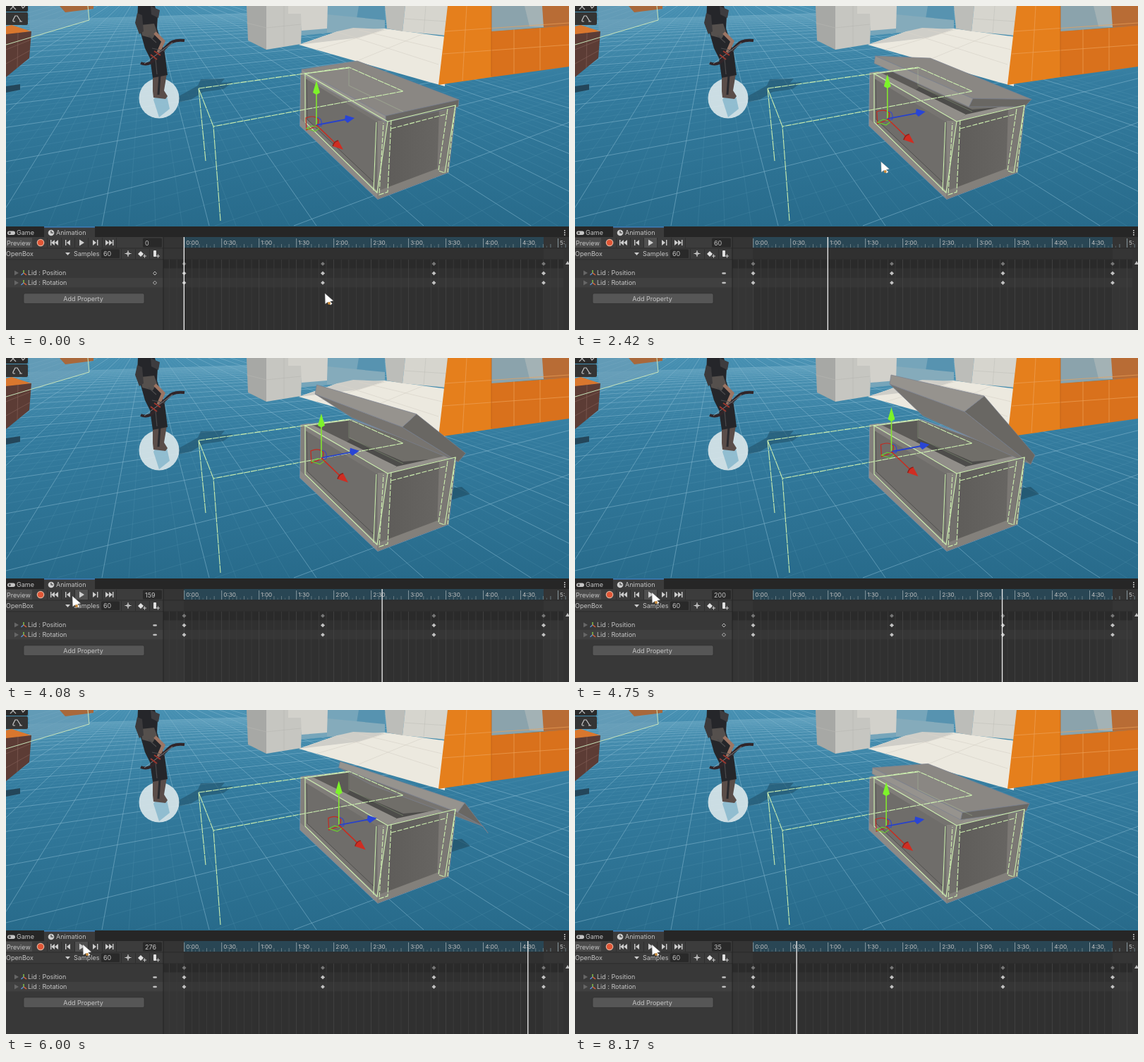
Write an HTML page that moves like this. It is 798 px wide and 460 px high and loops after 8.33 s.

```html
<!DOCTYPE html>
<html lang="en">
<head>
<meta charset="utf-8">
<title>Chest lid animation</title>
<style>
html, body { margin: 0; width: 100%; height: 100%; overflow: hidden; background: #383838; }
svg { display: block; width: 798px; height: 460px; }
text { font: 9px Inter, "Open Sans", sans-serif; fill: #c4c4c4; white-space: pre; }
.wire { fill: none; stroke: #cdf0b0; stroke-width: 1.1; }
</style>
</head>
<body>
<svg id="stage" viewBox="0 0 798 460">
<defs>
  <linearGradient id="floor" x1="0" y1="0" x2="0" y2="1">
    <stop offset="0" stop-color="#4790b2"/><stop offset=".35" stop-color="#347c9f"/><stop offset="1" stop-color="#286b8b"/>
  </linearGradient>
  <linearGradient id="front" x1="0" y1="0" x2="1" y2="1">
    <stop offset="0" stop-color="#85827e"/><stop offset="1" stop-color="#6b6966"/>
  </linearGradient>
  <linearGradient id="side" x1="0" y1="0" x2="1" y2="0">
    <stop offset="0" stop-color="#5d5b58"/><stop offset="1" stop-color="#6a6865"/>
  </linearGradient>
  <clipPath id="view"><rect width="798" height="313"/></clipPath>
</defs>
<g clip-path="url(#view)">
  <rect width="798" height="313" fill="url(#floor)"/>
  <g id="grid"></g>
  <g id="blocks"></g>
  <g id="hero"></g>
  <g id="chest"></g>
  <g id="lid"></g>
  <g id="wires"></g>
  <g id="gizmo"></g>
  <g id="tools"></g>
</g>
<g id="panel"></g>
<g id="live"></g>
<g id="tip"></g>
<g id="mouse"></g>
</svg>
<script>
const $ = id => document.getElementById(id);
const NS = 'http://www.w3.org/2000/svg';

function add(parent, tag, attrs, text) {
  const el = document.createElementNS(NS, tag);
  for (const k in attrs) el.setAttribute(k, attrs[k]);
  if (text != null) el.textContent = text;
  (typeof parent === 'string' ? $(parent) : parent).append(el);
  return el;
}
const poly = (g, points, fill, more) => add(g, 'polygon', { points, fill, ...more });
const path = (g, d, stroke, more) => add(g, 'path', { d, stroke, fill: 'none', ...more });
const rect = (g, x, y, width, height, fill, more) => add(g, 'rect', { x, y, width, height, fill, ...more });
const label = (g, x, y, s, more) => add(g, 'text', { x, y, ...more }, s);

// Floor grid: two bundles of lines that meet on the horizon
function bundle(vx, vy, from, to, step) {
  for (let i = 0, x = from; x <= to; x += step, i++) {
    const major = i % 4 === 0;
    path('grid', `M${vx} ${vy}L${x} 312`, major ? '#86b9cf' : '#6fa8c0',
      { 'stroke-width': major ? 1 : .7, opacity: major ? .55 : .24 });
  }
}
bundle(199, -36, -1080, 1500, 38);
bundle(1290, -20, -9000, 1100, 112);

// Far scenery
poly('blocks', '32,0 118,0 118,20 34,45', '#6b9fb9', { opacity: .75 });
poly('blocks', '76,0 124,0 124,4 84,9', '#a8683b');
poly('blocks', '0,29 8,27 36,36 0,41', '#d9772e');
poly('blocks', '0,40 36,36 33,74 0,101', '#5c3c35');
path('blocks', 'M0 62L35 48M0 82L34 63M17 38L16 88', '#85625a', { 'stroke-width': .6 });
path('blocks', 'M0 55L118 20L116 0', '#c7e4ba', { 'stroke-width': 1 });
poly('blocks', '0,114 20,111 20,119 0,123', '#24465a');
poly('blocks', '418,0 500,0 500,34 418,42', '#76a5ba');
poly('blocks', '500,0 537,0 537,34 495,30', '#5793b0');
poly('blocks', '455,12 537,20 537,36 455,38', '#85abbb');
poly('blocks', '415,55 470,36 537,32 625,44 622,114 600,108', '#ece9df');
poly('blocks', '415,55 470,36 492,31 537,33 500,45', '#cfcec8');
path('blocks', 'M470 37L613 83M500 34L618 62M440 62L540 33M500 77L590 40', '#d8d5cb', { 'stroke-width': .7 });
poly('blocks', '341,0 369,0 369,62 343,49', '#a7a8a5');
poly('blocks', '369,0 420,0 418,54 369,62', '#c6c6c1');
poly('blocks', '400,0 456,0 455,32 419,35 418,11 400,11', '#d2d1cb');
path('blocks', 'M369 31L418 26M394 0V58M341 24L369 31', '#b8b8b3', { 'stroke-width': .6 });
poly('blocks', '537,0 566,0 562,36 540,32', '#bcbdb9');
poly('blocks', '566,0 626,0 624,42 562,36', '#d6d5ce');
path('blocks', 'M564 18L625 22M595 0L592 39', '#c2c1bb', { 'stroke-width': .6 });
poly('blocks', '688,0 762,0 762,30 688,36', '#8ba3ac');
poly('blocks', '735,0 762,0 762,30 742,29', '#a3b2b5');
poly('blocks', '760,0 798,0 798,29 762,30', '#b86c35');
poly('blocks', '688,36 798,28 798,86 688,101', '#d9711c');
poly('blocks', '626,0 688,0 688,101 613,112', '#e57f1c');
path('blocks', 'M622 36L798 24M619 68L798 55M653 0L647 106M720 33V96M757 31V91', '#eda158', { 'stroke-width': .7 });
path('blocks', 'M688 0V100', '#bd611a', { 'stroke-width': .8 });

// Archer and ground marker
poly('hero', '245,128 272,113 276,104 310,103 305,109 322,108 308,118 280,122 262,133 244,137', '#24576f', { opacity: .65 });
add('hero', 'circle', { cx: 217, cy: 131, r: 28.5, fill: '#dce8ec', opacity: .9 });
poly('hero', '217,158 209,133 216,122 228,128 232,146', '#78afc8', { opacity: .7 });
poly('hero', '208,98 228,96 224,120 229,128 226,132 209,130 208,121', '#5a4d49');
path('hero', 'M218 98L216 126', '#2a2a2e', { 'stroke-width': 3 });
poly('hero', '187,0 211,0 215,14 214,32 219,48 225,66 229,98 208,102 204,74 197,60 190,35 186,20', '#25262a');
poly('hero', '191,27 210,25 214,36 208,46 193,42', '#55504d');
poly('hero', '186,10 193,13 195,36 189,40 183,24', '#3b3a3c');
poly('hero', '205,0 218,6 216,17 206,12', '#3d3c3f');
path('hero', 'M211 38L223 50L216 66', '#9b7564', { 'stroke-width': 5 });
path('hero', 'M191 81Q202 86 211 75T229 56Q236 47 253 49', '#302529', { 'stroke-width': 4 });
path('hero', 'M196 82L236 52', '#b8bdbd', { 'stroke-width': .6 });
path('hero', 'M205 69L214 76M210 64L219 70', '#9d372e', { 'stroke-width': 2 });
path('hero', 'M202 42L213 52M207 60L226 64M212 75L214 97', '#4b4a4c', { 'stroke-width': 1.2 });

// Chest body
const shade = poly('chest', '620,186 646,183 658,193 630,202', '#204f66');
poly('chest', '418,95 490,87 638,140 627,236 527,274 417,170', '#767470',
  { stroke: '#7b91aa', 'stroke-width': 1.6, 'stroke-linejoin': 'round' });
poly('chest', '430,97 487,89 627,138 552,156', '#4d4c4a');
poly('chest', '487,89 627,138 612,143 563,147 487,114', '#706e69');
poly('chest', '432,97 487,89 487,116 480,121', '#5c5a57');
poly('chest', '418,95 430,93 554,154 541,164', '#918e89');
poly('chest', '541,164 554,154 627,138 638,140', '#94918c');
poly('chest', '418,95 541,164 527,274 417,170', 'url(#front)');
poly('chest', '426,104 526,165 521,250 426,161', '#6f6d6a');
poly('chest', '417,160 526,262 527,274 417,170', '#8d8a86');
poly('chest', '541,164 638,140 627,236 527,274', 'url(#side)');
poly('chest', '527,163 546,163 542,264 526,268', '#85827d');
poly('chest', '541,164 546,163 542,264 527,268', '#716f6b');
poly('chest', '614,146 638,140 627,236 611,240', '#7b7874');
poly('chest', '526,263 627,225 627,236 527,274', '#83807b');
path('chest', 'M426 104L427 161L521 250M526 165L521 250', '#50504e', { 'stroke-width': 1 });

// Lid corners at each key: L BL BR FR, then the lower Li FRi BRi BLi, then the gizmo origin
const lidKeys = [
  [0, 419,90, 498,78, 642,133, 538,156, 419,97, 538,165, 641,143, 498,88, 440,169],
  [111, 431,56, 508,71, 651,132, 584,112, 428,69, 574,126, 635,143, 487,88, 445,153],
  [200, 448,24, 518,76, 652,138, 580,54, 446,37, 552,76, 646,151, 493,82, 448.5,133],
  [288, 475,76, 540,100, 685,177, 654,136, 473,84, 645,149, 678,166, 520,108, 473,165]
];
const faces = [
  ['0123', '#8a8783'], ['4567', '#777470'], ['3265', '#696763'], ['0354', '#96938e']
].map(([ids, fill]) => ({
  ids: [...ids].map(Number),
  el: poly('lid', '', fill, { stroke: '#7b8290', 'stroke-width': .7, 'stroke-linejoin': 'round' })
}));

function lidPose(frame) {
  let i = 0;
  while (i < 2 && frame > lidKeys[i + 1][0]) i++;
  const a = lidKeys[i], b = lidKeys[i + 1];
  const u = Math.min(1, (frame - a[0]) / (b[0] - a[0]));
  const s = u * u * (3 - 2 * u);
  const v = a.slice(1).map((n, j) => n + (b[j + 1] - n) * s);
  return Array.from({ length: 9 }, (_, j) => [v[2 * j], v[2 * j + 1]]);
}
function turn(pts) {
  return pts.reduce((sum, p, i) => {
    const q = pts[(i + 1) % pts.length];
    return sum + p[0] * q[1] - q[0] * p[1];
  }, 0);
}

// Collider outlines
const wire = (d, more) => add('wires', 'path', { d, class: 'wire', ...more });
wire('M283 220L273 117L294 171L304 305', { 'stroke-dasharray': '14 1' });
wire('M273 117L486 87L563 121L294 171', { 'stroke-dasharray': '9 1' });
wire('M424 96L424 165L526 265L541 164Z');
wire('M424 96L486 88M541 164L637 141L622 237M525 165L521 262', { 'stroke-width': .9 });
wire('M546 162L541 264L529 268L535 166M626 146L613 234L622 237M637 141L626 236M546 174L626 153', { 'stroke-dasharray': '7 2', 'stroke-width': .8 });
wire('M486 88V113L563 150', { opacity: .22 });

// Move gizmo, drawn around its own origin
path('gizmo', 'M-15 -10L-14 7L2 1L3 -8Q-3 -14 -12 -11Z', '#c22b20', { 'stroke-width': 1.2 });
path('gizmo', 'M-14 5L-2 9L5 4L-6 1Z', '#69d32c', { 'stroke-width': 1.1 });
path('gizmo', 'M0 -11Q9 -10 7 1L1 3', '#3448c8', { 'stroke-width': 1.1 });
path('gizmo', 'M0 0V-46', '#83e530', { 'stroke-width': 1.6 });
path('gizmo', 'M0 0L42 -8', '#2842cb', { 'stroke-width': 1.8 });
path('gizmo', 'M0 0L26 25', '#c82d20', { 'stroke-width': 1.6 });
poly('gizmo', '0,-63 5,-46 0,-43 -5,-46', '#7df32a');
poly('gizmo', '54,-10 41,-14 40,-7 44,-3', '#2945d5');
poly('gizmo', '38,35 23,30 25,24 31,22', '#cf2d22');
path('gizmo', 'M23 30Q25 23 31 22', '#8d211b', { 'stroke-width': 1.5 });

// Scene view buttons
rect('tools', -3, -3, 34, 11, '#2b2b2b', { rx: 2 });
rect('tools', -3, 9, 34, 18, '#343434', { rx: 2 });
path('tools', 'M6 -3L14 5M14 -3L6 5M22 0L24 3L27 0', '#bcbcbc', { 'stroke-width': 1.2 });
path('tools', 'M10 22V20L13 14H16L21 22M10 22H13M19 22H23', '#c6c6c6', { 'stroke-width': 1.2 });

// Animation window
const X0 = 252.3, PER = 1.766;
rect('panel', 0, 313, 798, 147, '#383838');
rect('panel', 0, 313, 798, 15, '#262626');
rect('panel', 54, 313, 72, 15, '#3b3b3b');
rect('panel', 54, 313, 72, 1.6, '#3b7ab5');
rect('panel', 2, 319.5, 11, 5.5, '#c4c4c4', { rx: 2.7 });
path('panel', 'M3.5 322.2H7M5.2 320.5V324', '#262626');
label('panel', 15, 325, 'Game');
add('panel', 'circle', { cx: 64, cy: 322, r: 4.3, fill: '#cfcfcf' });
path('panel', 'M64 319V322H67', '#333', { 'stroke-width': 1.1 });
label('panel', 71, 325, 'Animation', { fill: '#d8d8d8' });
for (const y of [318, 321, 324]) rect('panel', 791, y, 1.7, 1.7, '#c4c4c4');

rect('panel', 0, 328, 223, 16, '#3c3c3c');
rect('panel', 0, 329, 37, 14, '#4c4c4c');
label('panel', 1, 339.5, 'Preview');
const playBg = rect('panel', 98, 329, 18, 14, '#505050');
add('panel', 'circle', { cx: 49, cy: 336, r: 4.7, fill: '#df5535', stroke: '#e5b29d', 'stroke-width': 1.2 });
const ink = '#cdcdcd';
const tri = (x, d) => poly('panel', `${x},332 ${x + 5 * d},336 ${x},340`, ink);
rect('panel', 63, 332, 1.4, 8, ink); tri(69, -1); tri(74, -1);
rect('panel', 84, 332, 1.4, 8, ink); tri(91, -1);
poly('panel', '104,331.5 111,336 104,340.5', ink);
tri(123, 1); rect('panel', 129, 332, 1.4, 8, ink);
tri(141, 1); tri(146, 1); rect('panel', 151, 332, 1.4, 8, ink);
for (const x of [58, 78, 97, 116, 136, 156]) rect('panel', x, 329, .8, 14, '#2c2c2c');
rect('panel', 194, 329.5, 27, 13, '#292929', { rx: 1.5 });

rect('panel', 0, 344, 223, 16, '#3b3b3b');
rect('panel', 0, 343.5, 223, .8, '#282828');
rect('panel', 0, 359.5, 223, .8, '#282828');
label('panel', 0, 355, 'OpenBox');
poly('panel', '84,350 91,350 87.5,354', ink);
label('panel', 96, 355, 'Samples');
rect('panel', 135, 345.5, 26, 12.5, '#292929', { rx: 1.5 });
label('panel', 138, 355, '60');
path('panel', 'M173 347V356M168.5 351.5H177.5M173 349L175.5 351.5L173 354L170.5 351.5Z', ink);
poly('panel', '187,352 191,348 195,352 191,356', '#e0e0e0');
path('panel', 'M194 355H199M196.5 352.5V357.5M213 355H218M215.5 352.5V357.5', ink);
rect('panel', 209, 347, 4, 9, '#e0e0e0', { rx: 1 });
for (const x of [163, 183, 203]) rect('panel', x, 345, .8, 14, '#2c2c2c');

rect('panel', 0, 386, 223, 13.5, '#404040');
[['Position', 379], ['Rotation', 393]].forEach(([name, y]) => {
  poly('panel', `12,${y - 3.5} 18,${y} 12,${y + 3.5}`, '#666');
  path('panel', `M25 ${y}V${y - 4}`, '#86c84a', { 'stroke-width': 1.4 });
  path('panel', `M25 ${y}L21.5 ${y + 3}`, '#5a91d6', { 'stroke-width': 1.4 });
  path('panel', `M25 ${y}L29 ${y + 3}`, '#e0653c', { 'stroke-width': 1.4 });
  label('panel', 31, y + 3.2, 'Lid : ' + name, { fill: '#b0b0b0' });
});
rect('panel', 25, 408, 171, 14.5, '#565656', { rx: 2, stroke: '#2e2e2e', 'stroke-width': .7 });
label('panel', 109.5, 418.5, 'Add Property', { 'text-anchor': 'middle', fill: '#dedede' });

// Ruler and dope sheet
rect('panel', 223, 328, 575, 16, '#343434');
rect('panel', X0, 328, 509.7, 15.5, '#294654');
rect('panel', 223, 344, 575, 116, '#353535');
rect('panel', X0, 344, 509.7, 116, '#303030');
rect('panel', 223, 359.5, 575, 13, '#282828', { opacity: .75 });
rect('panel', 223, 386, 575, 13.5, '#3a3a3a', { opacity: .7 });
for (let f = -12; f <= 306; f += 6) {
  const x = X0 + f * PER, big = f % 30 === 0;
  rect('panel', x, 360, .8, 100, big ? '#454545' : '#3d3d3d');
  if (f < 0) continue;
  rect('panel', x, big ? 330 : 338, .9, big ? 13 : 5, big ? '#91a2a9' : '#6d8088');
  if (!big) rect('panel', x - 3 * PER, 340.5, .7, 2.5, '#5d7078');
  if (big) label('panel', x + 3, 339,
    f < 300 ? `${Math.floor(f / 60)}:${f % 60 ? '30' : '00'}` : '5:',
    { style: 'font-size:8.2px', fill: f < 300 ? '#aab3b6' : '#666' });
}
rect('panel', 222.5, 328, 1, 132, '#232323');
rect('panel', 223, 343.5, 575, .8, '#262626');
rect('panel', 790, 344, 8, 116, '#333');
poly('panel', '793,367 796,362 799,367', '#bdbdbd');
for (const x of [252.5, 449, 606.5, 762]) {
  for (const y of [366, 379.5, 393])
    poly('panel', `${x - 3.3},${y} ${x},${y - 3.3} ${x + 3.3},${y} ${x},${y + 3.3}`,
      y < 370 ? '#777' : '#c2c2c2', { stroke: '#202020', 'stroke-width': .6 });
}

// Moving parts of the window
const counter = label('live', 197, 339.5, '0', { fill: '#d2d2d2' });
const head = rect('live', 252, 328, 1.3, 132, '#f0f0f0');
const marks = [379.5, 393].map(y => ({
  key: poly('live', `208.5,${y} 211,${y - 2.5} 213.5,${y} 211,${y + 2.5}`, '#353535', { stroke: '#bdbdbd', 'stroke-width': 1 }),
  dash: rect('live', 208.3, y - 1.3, 5.6, 2.6, '#c0c0c0', { rx: 1.3 })
}));

rect('tip', 56, 0, 106, 18, '#262626', { stroke: '#1b1b1b', 'stroke-width': .8 });
label('tip', 61, 12, 'Play the animation clip.', { fill: '#cfcfcf' });

poly('mouse', '0,0 .5,15 4,12.5 8,16.5 10.5,14.5 7.5,11.5 12,10.5', '#fff', { stroke: '#777', 'stroke-width': .4 });
add('mouse', 'circle', { cx: 6, cy: 14, r: 2, fill: '#c98b3c' });

// Timing: [ms, value...]
const LOOP = 8330, LAST = 289;
const playKeys = [[0, 0], [1420, 0], [1670, 15.4], [3080, 99.4], [4080, 159.4], [5330, 236.4], [6750, 320.4], [6820, 324.4]];
const mouseKeys = [
  [0, 452, 408], [250, 452, 408], [900, 110, 340], [1790, 110, 340], [2550, 461, 211],
  [3330, 461, 211], [4080, 94, 338], [4420, 109, 333], [LOOP, 109, 333]
];
const tips = [[1250, 1800, 349], [4920, 5750, 343]];

function sample(keys, t, ease = u => u) {
  const i = keys.findIndex(k => k[0] > t);
  if (i < 0) return keys[keys.length - 1].slice(1);
  const a = keys[i - 1], b = keys[i];
  const u = ease((t - a[0]) / (b[0] - a[0]));
  return a.slice(1).map((v, j) => v + (b[j + 1] - v) * u);
}
const smooth = u => u * u * (3 - 2 * u);
const show = (el, on) => el.setAttribute('visibility', on ? 'visible' : 'hidden');
const move = (id, x, y) => $(id).setAttribute('transform', `translate(${x} ${y})`);

function draw(t) {
  const frame = Math.floor(sample(playKeys, t)[0] % LAST);
  const pose = lidPose(frame);
  for (const { ids, el } of faces) {
    const pts = ids.map(i => pose[i]);
    el.setAttribute('points', pts.map(p => p.join()).join(' '));
    show(el, turn(pts) > 0);
  }
  shade.setAttribute('opacity', Math.max(0, Math.min(.7, (frame - 80) / 110)));
  move('gizmo', ...pose[8]);

  counter.textContent = frame;
  head.setAttribute('x', X0 + frame * PER - .6);
  const onKey = lidKeys.some(k => k[0] === frame);
  for (const m of marks) { show(m.key, onKey); show(m.dash, !onKey); }
  show(playBg, t >= 1420 && t < 6820);

  const tip = tips.find(([from, to]) => t >= from && t < to);
  show($('tip'), tip);
  if (tip) move('tip', 0, tip[2]);
  move('mouse', ...sample(mouseKeys, t, smooth));
}

const STEP = 1000 / 12;
const begin = performance.now();
function tick() {
  const t = (performance.now() - begin) % LOOP;
  const k = Math.min(98, Math.floor((t + 4) / STEP));
  draw(Math.round(k * STEP / 10) * 10);
  requestAnimationFrame(tick);
}
draw(0);
requestAnimationFrame(tick);
</script>
</body>
</html>
```
